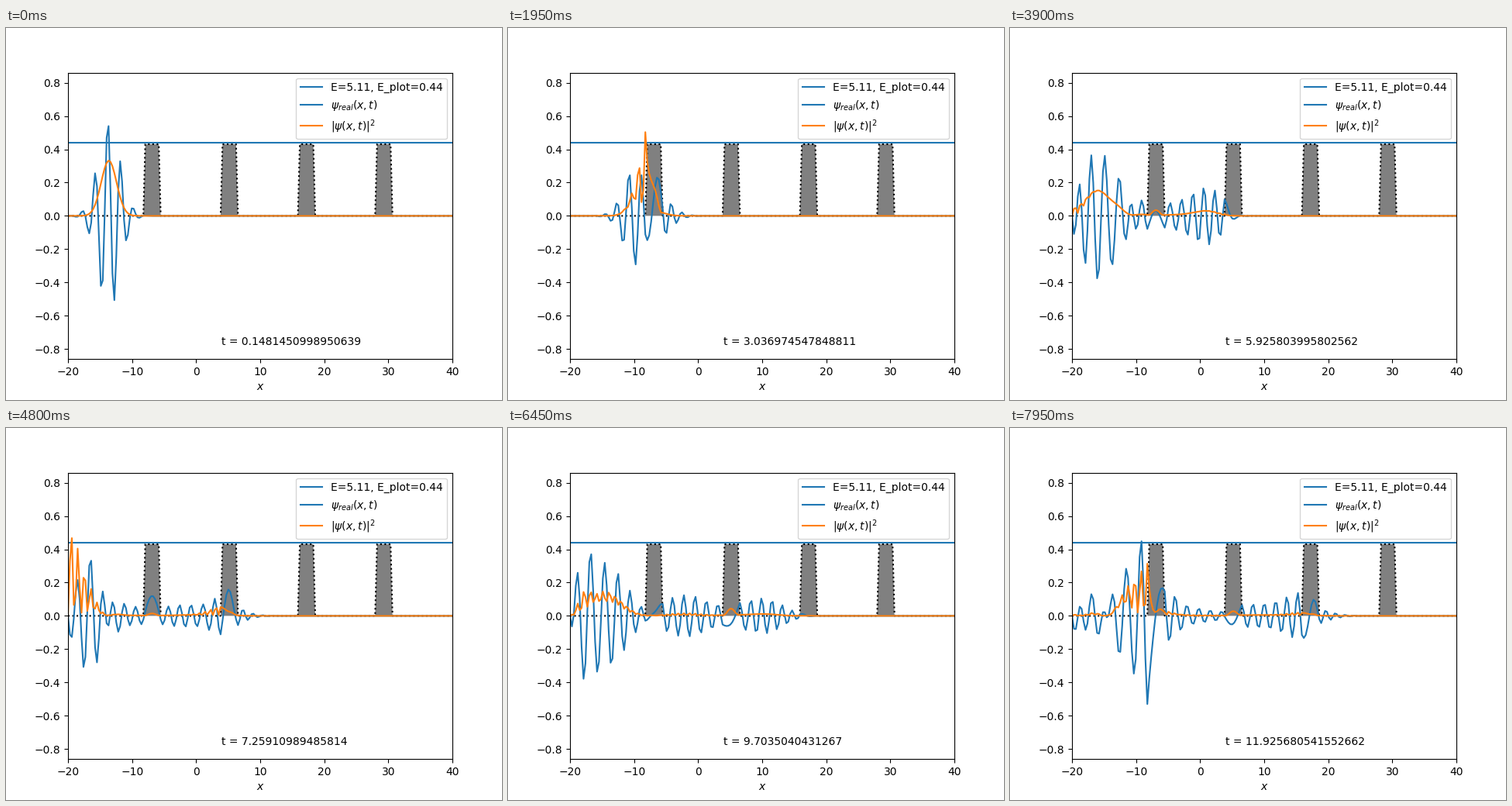
Animation of 640 by 480 pixels, one loop 8 s. Source, as a matplotlib script:

```python
import matplotlib.pyplot as plt
import numpy as np
from matplotlib.animation import FuncAnimation

# Wave packet and row of barriers (hbar = m = 1)
N = 200
K0, SIGMA, X0 = np.pi, 1.2, -14.0
V0, BARRIER_WIDTH, BARRIER_STARTS = 5.0, 2.4, (-8, 4, 16, 28)
DT = 0.1481450998950639 / 2      # 2 / (2/dx^2 + V0)
ENERGY = 0.5 * (K0**2 + 0.5 / SIGMA**2)

FRAMES, INTERVAL, HOLD = 160, 50, 3
FIRST_STEP, STEPS_PER_POSE = 2, 3

x = np.linspace(-20, 40, N)
dx = 60 / (N - 1)

potential = np.zeros(N)
for start in BARRIER_STARTS:
    potential[(x >= start) & (x <= start + BARRIER_WIDTH)] = V0

psi0 = np.exp(-((x - X0) / (2 * SIGMA))**2 + 1j * K0 * (x - X0))
psi0 /= np.sqrt(dx * np.sum(np.abs(psi0)**2))

# Crank-Nicolson evolution in the eigenbasis, hard walls at both ends
hop = np.full(N - 3, -0.5 / dx**2)
hamiltonian = np.diag(1 / dx**2 + potential[1:-1]) + np.diag(hop, 1) + np.diag(hop, -1)
levels, modes = np.linalg.eigh(hamiltonian)
weights = modes.T @ psi0[1:-1]
phase_step = 2 * np.arctan(levels * DT / 2)

last_step = FIRST_STEP + STEPS_PER_POSE * ((FRAMES - 1) // HOLD)
times = np.cumsum(np.full(last_step, DT))


def wave(step):
    inner = modes @ (weights * np.exp(-1j * phase_step * step))
    return np.pad(inner, 1)


y_max = 1.5 * psi0.real.max()
scale = y_max / 2 / V0

fig, ax = plt.subplots(figsize=(6.4, 4.8), dpi=100)
ax.set_xlim(-20, 40)
ax.set_ylim(-y_max, y_max)
ax.set_xlabel("$x$")

ax.fill_between(x, potential * scale, facecolor="gray")
ax.plot(x, potential * scale, ":k")
ax.axhline(ENERGY * scale, color="C0",
           label=f"E={ENERGY:.2f}, E_plot={ENERGY * scale:.2f}")
real_line, = ax.plot(x, psi0.real, "C0", label=r"$\psi_{real}(x,t)$")
prob_line, = ax.plot(x, np.abs(psi0)**2, "C1", label=r"$|\psi(x,t)|^2$")
clock = ax.text(0.4, 0.05, "", transform=ax.transAxes)
ax.legend(loc="upper right")


def update(frame):
    step = FIRST_STEP + STEPS_PER_POSE * (frame // HOLD)
    psi = wave(step)
    real_line.set_ydata(psi.real)
    prob_line.set_ydata(np.abs(psi)**2)
    clock.set_text(f"t = {float(times[step - 1])}")
    return real_line, prob_line, clock


anim = FuncAnimation(fig, update, frames=FRAMES, interval=INTERVAL,
                     repeat=True, repeat_delay=0)
plt.show()
```
